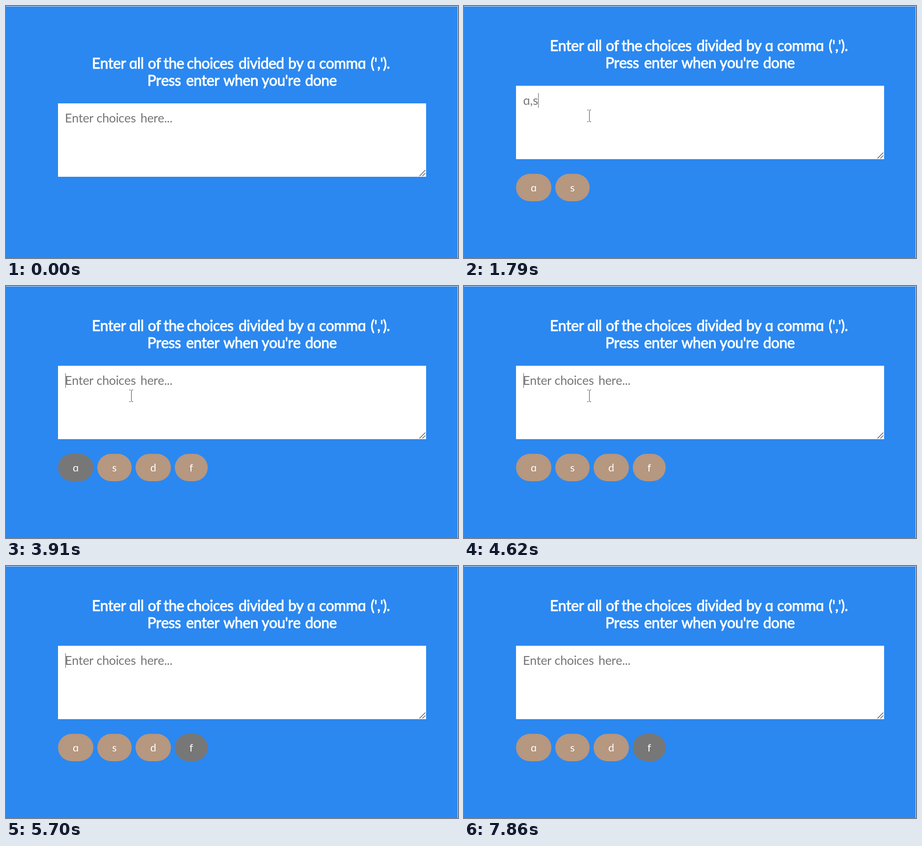
Animation, 921 px wide and 515 px high, one loop 7.9 s. Source, as an HTML page with a canvas:

```html
<!DOCTYPE html>
<html lang="en">
<head>
<meta charset="utf-8">
<title>Random choice picker</title>
<style>
  html, body { margin: 0; width: 100%; height: 100%; overflow: hidden; background: #2b88f0; }
  canvas { display: block; }
</style>
</head>
<body>
<canvas id="stage" width="921" height="515"></canvas>
<script>
const ctx = document.getElementById('stage').getContext('2d');
const LOOP = 7900;
const FONT = 'Lato, "Noto Sans", sans-serif';
const BLINK = 530;

// Words with the left edge of their ink
const HEADING = [
  [['Enter', 177], ['all', 252], ['of', 290], ['the', 321], ['choices', 369.5],
   ['divided', 475], ['by', 577], ['a', 614.5], ['comma', 639], ["(',').", 744]],
  [['Press', 290], ['enter', 368], ['when', 443], ["you're", 521], ['done', 610.5]]
];
const PLACEHOLDER = [['Enter', 122], ['choices', 185.5], ['here...', 275]];

const TYPED = 'a,s,d,f';
const KEY_TIMES = [1190, 1450, 1620, 2030, 2270, 2510, 2710];
const FOCUS = 390, ENTER = 3510, BLUR = 7860;

const PILLS = [
  { label: 'a', x: 106, w: 72, from: 1320 },
  { label: 's', x: 186, w: 70, from: 1790 },
  { label: 'd', x: 264, w: 72, from: 2410 },
  { label: 'f', x: 344, w: 67, from: 2840 }
];

// One pick per tick; '-' is a tick where nothing is lit
const PICKS = 'sdsadsasad--sfadfsadsfasfdsads';
const PICK_START = 3600, TICK = 100, FINAL = 6650;

// The lettering uses a single-storey "a"
const glyphs = s => s.replace(/a/g, '\u0251');

function setFont(size, color, spacing = 0) {
  ctx.font = `${size}px ${FONT}`;
  ctx.fontKerning = 'none';
  ctx.letterSpacing = `${spacing}px`;
  ctx.fillStyle = ctx.strokeStyle = color;
}

function drawWords(words, y, bold) {
  for (const [word, left] of words) {
    const s = glyphs(word);
    const x = left + ctx.measureText(s).actualBoundingBoxLeft;
    ctx.fillText(s, x, y);
    if (bold) ctx.strokeText(s, x, y);
  }
}

function drawHeading(top) {
  setFont(30, '#fff', -0.5);
  ctx.lineWidth = 0.9;
  ctx.lineJoin = 'round';
  HEADING.forEach((line, i) => drawWords(line, top - 71 + i * 35, true));
}

function drawGrip(bottom) {
  ctx.strokeStyle = '#4c4c52';
  ctx.lineWidth = 1.2;
  ctx.beginPath();
  for (const n of [12, 6]) {
    ctx.moveTo(854.5 - n, bottom - 1.5);
    ctx.lineTo(854.5, bottom - 1.5 - n);
  }
  ctx.stroke();
}

function caretOn(t, keys) {
  if (t < FOCUS || t >= BLUR) return false;
  const base = t >= ENTER ? ENTER - 30 : keys ? KEY_TIMES[keys - 1] : FOCUS;
  return Math.floor((t - base) / BLINK) % 2 === 0;
}

function drawField(t, top) {
  ctx.fillStyle = '#fff';
  ctx.fillRect(106, top, 750, 150);
  const keys = t < ENTER ? KEY_TIMES.filter(k => t >= k).length : 0;
  const text = glyphs(TYPED.slice(0, keys));
  setFont(25, '#757575', keys ? 0 : -0.3);
  if (keys) ctx.fillText(text, 120.5, top + 39);
  else drawWords(PLACEHOLDER, top + 39);
  if (caretOn(t, keys)) {
    const x = 121 + Math.floor(ctx.measureText(text).width);
    ctx.fillStyle = '#606060';
    ctx.fillRect(x, top + 15, 1, 30);
  }
  drawGrip(top + 150);
}

function litLabel(t) {
  if (t >= FINAL) return 'f';
  return t < PICK_START ? '' : PICKS[Math.floor((t - PICK_START) / TICK)];
}

function drawPills(t) {
  const lit = litLabel(t);
  ctx.textAlign = 'center';
  for (const { label, x, w, from } of PILLS) {
    if (t < from) continue;
    ctx.fillStyle = label === lit ? '#777' : '#b6977f';
    ctx.beginPath();
    ctx.roundRect(x, 343, w, 56, 28);
    ctx.fill();
    setFont(21.5, '#fff');
    ctx.fillText(glyphs(label), x + w / 2, 379);
  }
  ctx.textAlign = 'left';
}

function drawBeam(x, y) {
  ctx.fillStyle = '#4a4a4a';
  ctx.fillRect(x, y - 11, 1, 23);
  for (const end of [y - 12, y + 12]) {
    ctx.fillRect(x - 4, end, 3, 1);
    ctx.fillRect(x + 1, end, 3, 1);
  }
}

function drawArrow(x, y) {
  const shape = [[0, 0], [0, 16], [4, 12.5], [6.5, 18], [9, 17], [6.5, 11.5], [11.5, 11.5]];
  ctx.beginPath();
  for (const [dx, dy] of shape) ctx.lineTo(x + dx + 0.5, y + dy + 0.5);
  ctx.closePath();
  ctx.fillStyle = '#fff';
  ctx.strokeStyle = '#000';
  ctx.lineWidth = 1;
  ctx.lineJoin = 'miter';
  ctx.fill();
  ctx.stroke();
}

function drawPointer(t, top) {
  const rest = [255, 224];
  const mix = (a, b, p) => a.map((v, i) => Math.round(v + (b[i] - v) * p));
  let pos = rest;
  if (t < 70 || t >= 5490) return;
  if (t < 490) pos = mix([779, 508], rest, 1 - (1 - (t - 70) / 420) ** 2);
  else if (t >= 4790) pos = mix(rest, [733, 515], ((t - 4790) / 700) ** 1.6);
  const [x, y] = pos;
  if (y < top + 150) drawBeam(x, y);
  else drawArrow(x, y);
}

function draw(t) {
  const top = t < PILLS[0].from ? 199 : 163;
  ctx.fillStyle = '#2b88f0';
  ctx.fillRect(0, 0, 921, 515);
  ctx.fillStyle = '#d3dae3';
  ctx.fillRect(0, 0, 921, 1);
  ctx.fillRect(920, 0, 1, 515);
  drawHeading(top);
  drawField(t, top);
  drawPills(t);
  drawPointer(t, top);
}

const start = performance.now();
function frame() {
  draw((performance.now() - start) % LOOP);
  requestAnimationFrame(frame);
}
frame();
</script>
</body>
</html>
```
